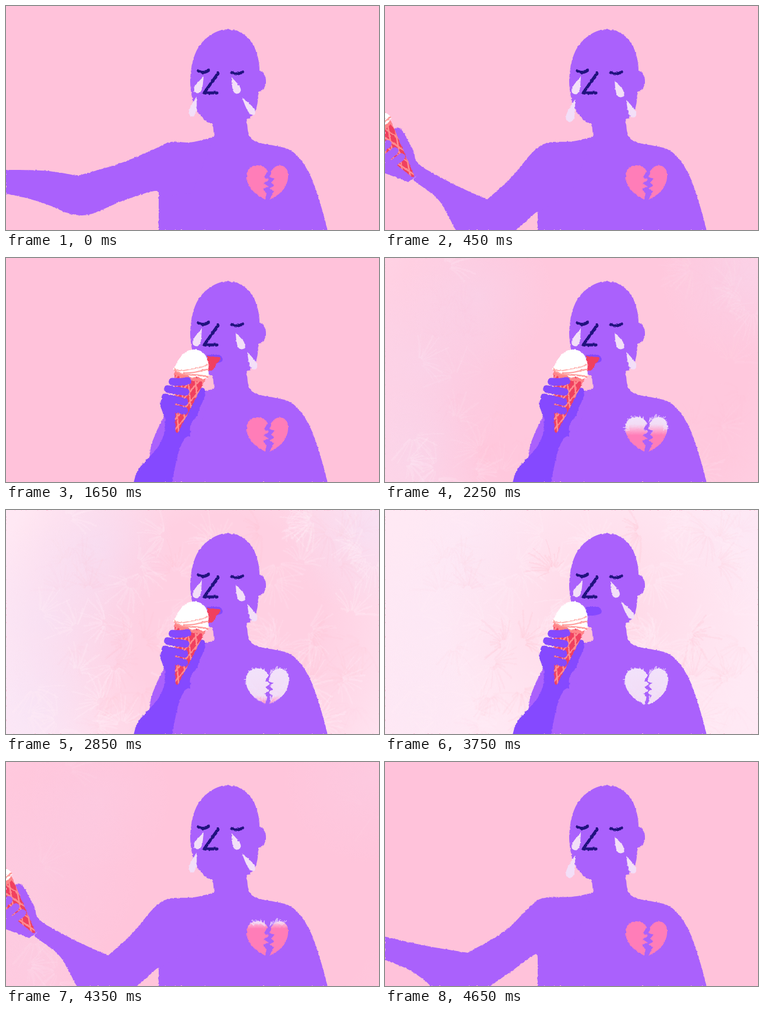
Recreate the animation shown at these times as an HTML page with a canvas. Size 640 px wide and 384 px high, loop 4800 ms.

```html
<!DOCTYPE html>
<html lang="en">
<head>
<meta charset="utf-8">
<title>Ice cream for a broken heart</title>
<style>
  html, body { margin: 0; width: 100%; height: 100%; overflow: hidden; background: #ffc2da; }
  canvas { display: block; width: 640px; height: 384px; filter: url(#rough); }
  svg { position: absolute; width: 0; height: 0; }
</style>
</head>
<body>
<svg aria-hidden="true">
  <filter id="rough" x="0" y="0" width="100%" height="100%" color-interpolation-filters="sRGB">
    <feTurbulence type="fractalNoise" baseFrequency="0.25" numOctaves="2" seed="4" result="noise"/>
    <feDisplacementMap in="SourceGraphic" in2="noise" scale="3" xChannelSelector="R" yChannelSelector="G"/>
  </filter>
</svg>
<canvas id="stage" width="640" height="384"></canvas>
<script>
const ctx = document.getElementById('stage').getContext('2d');
const STEP = 150, STEPS = 32;
const PINK = '#ffc2da', SKIN = '#aa61fc', HAND = '#8549ff', INK = '#20127e',
      TEAR = '#f3dff8', RED = '#f0405f', CORAL = '#ff8d90', ROSE = '#ff7db8';

const clamp = (v, a = 0, b = 1) => Math.min(b, Math.max(a, v));
const mix = (a, b, u) => a + (b - a) * u;
const mixAll = (a, b, u) => a.map((v, i) => mix(v, b[i], u));

function fill(d, color) {
  ctx.fillStyle = color;
  ctx.fill(typeof d === 'string' ? new Path2D(d) : d);
}
function line(d, color, width) {
  ctx.strokeStyle = color;
  ctx.lineWidth = width;
  ctx.stroke(typeof d === 'string' ? new Path2D(d) : d);
}
function seeded(s) {
  return () => {
    s = (s * 1664525 + 1013904223) >>> 0;
    return s / 4294967296;
  };
}

// Smooth curve through points from..to of a flat x,y list
function curve(path, xy, from, to) {
  const at = i => { i = clamp(i, from, to); return [xy[2 * i], xy[2 * i + 1]]; };
  path.lineTo(...at(from));
  for (let i = from; i < to; i++) {
    const [a, b, c, d] = [at(i - 1), at(i), at(i + 1), at(i + 2)];
    path.bezierCurveTo(b[0] + (c[0] - a[0]) / 6, b[1] + (c[1] - a[1]) / 6,
      c[0] - (d[0] - b[0]) / 6, c[1] - (d[1] - b[1]) / 6, ...c);
  }
}

const BODY = 'M380 40C402 40 420 54 428 75Q435 92 435 111C443 113 446 121 446 128' +
  'C446 138 441 146 433 147Q433 169 427 182Q422 191 413 195L415 214Q419 230 432 234' +
  'C452 239 475 240 488 247C505 258 517 278 525 297Q540 335 552 386L262 400L262 320' +
  'L300 236L322 233Q342 229 357 224L355 203Q340 198 330 183C320 168 316 145 316 128' +
  'C317 105 321 86 330 71C342 53 362 40 380 40Z';

// Arm outlines: shoulder, inner elbow, wrist, outer elbow, armpit
const ARM_OUT = [357,224, 322,234, 283,233, 255,245, 195,270, 123,291, 60,282, -50,281,
  -50,312, 30,328, 75,342, 110,356, 145,357, 200,334, 256,317, 262,328];
const ARM_LOW = [357,224, 322,231, 273,233, 250,247, 205,290, 142,327, 60,313, -50,287,
  -50,322, 30,351, 65,372, 95,395, 150,400, 205,367, 255,331, 262,335];
const ARM_UP = [357,224, 322,233, 285,236, 256,255, 228,298, 209,336, 190,305, 181,268,
  145,274, 150,310, 153,350, 160,384, 185,405, 230,410, 259,380, 261,376];
const SLEEVE_MID = [357,224, 322,233, 285,236, 262,262, 240,300, 228,335, 225,400];
const SLEEVE_EAT = [357,224, 322,233, 290,240, 272,270, 255,305, 247,335, 245,400];

function drawArm(pose) {
  const path = new Path2D();
  path.moveTo(320, 320);
  if (pose > 5) {
    curve(path, pose > 6 ? SLEEVE_EAT : SLEEVE_MID, 0, 6);
    path.lineTo(320, 400);
  } else {
    const xy = pose < 1 ? ARM_OUT : mixAll(ARM_LOW, ARM_UP, (pose - 1) / 4);
    curve(path, xy, 0, 5);
    curve(path, xy, 5, 7);
    curve(path, xy, 8, 15);
  }
  path.closePath();
  fill(path, SKIN);
}

const CONE = new Path2D('M-28-104L28-104L2-2Q0 2-3-3Z');

// Hand with ice cream; the origin is the tip of the cone
function drawTreat(x, y, turn, skin) {
  ctx.save();
  ctx.translate(x, y);
  ctx.rotate(turn * Math.PI / 180);
  fill('M-36-60Q-42-46-36-36Q-26-20-13 1L24 1Q18-14 21-24Q29-36 29-52Q34-72 32-80' +
    'Q29-88 22-85Q18-78 19-68L0-20L-10-50Z', skin);

  fill(CONE, RED);
  ctx.save();
  ctx.clip(CONE);
  for (let i = -8; i < 9; i++) {
    line(`M${i * 13 - 20}-110L${i * 13 + 18} 4M${i * 13 + 25}-110L${i * 13 - 35} 4`, CORAL, 2.6);
  }
  line('M-28-100Q0-93 28-100', '#ff8588', 6);
  ctx.restore();

  fill('M-31-105Q-28-111-27-119Q-24-126-22-131Q-15-146 2-147Q18-146 23-133Q28-128 28-118' +
    'Q32-110 31-104Q22-98 12-102Q3-96-6-101Q-18-98-31-105Z', '#fff');
  line('M-29-107Q-20-103-10-108T10-117T25-126', '#ffb3b0', 2.2);
  line('M-12-103Q4-106 14-112T28-118', '#ff9c9b', 2.2);
  line('M-28-104Q-14-99-2-102T30-106', '#ff9c9b', 2.8);

  line('M-27-84Q-12-86-2-91M-32-70Q-15-71-1-72M-33-55L1-55M-31-40L4-40', skin, 13);
  ctx.restore();
}

function drawHold(pose) {
  if (pose < 1) return;
  if (pose < 6) {
    const u = (pose - 1) / 4;
    drawTreat(mix(-60, 159, u), mix(305, 281, u), mix(-75, 0, u), SKIN);
    return;
  }
  const dx = pose > 6 ? 0 : -70, dy = pose > 6 ? 0 : -8;
  ctx.save();
  ctx.translate(dx, dy);
  fill('M272 280Q276 300 262 322Q250 338 235 352Q220 366 217 400L282 400Q291 350 298 326' +
    'Q304 310 318 298L300 280Z', HAND);
  ctx.restore();
  drawTreat(293 + dx, 300 + dy, pose > 6 ? 13 : 7, HAND);
}

function tear(x1, y1, x2, y2, w) {
  const len = Math.hypot(x2 - x1, y2 - y1);
  ctx.save();
  ctx.translate(x1, y1);
  ctx.rotate(Math.atan2(y2 - y1, x2 - x1));
  fill(`M0 0C${len * .4} ${-w * .35} ${len * .62} ${-w * .55} ${len * .8} ${-w * .5}` +
    `C${len * 1.06} ${-w * .4} ${len * 1.06} ${w * .4} ${len * .8} ${w * .5}` +
    `C${len * .62} ${w * .55} ${len * .4} ${w * .35} 0 0Z`, TEAR);
  ctx.restore();
}

function drawFace(fallen) {
  line('M330 111Q339 117 348 110M387 114Q397 119 406 113', INK, 5);
  line('M364 115L340 149L362 149', INK, 5);
  if (fallen) {
    tear(336, 121, 324, 151, 13);
    tear(326, 160, 315, 199, 14);
    tear(394, 128, 407, 156, 13);
    tear(414, 161, 428, 191, 12);
  } else {
    tear(339, 121, 326, 149, 13);
    tear(327, 155, 318, 189, 12);
    tear(387, 122, 399, 150, 13);
    tear(405, 157, 426, 186, 11);
  }
}

function drawMouth(open) {
  fill('M345 166L366 166Q374 171 371 177Q364 182 345 181Z', HAND);
  if (open) fill('M345 168L367 170Q371 174 361 181Q359 189 353 193L345 193Z', RED);
}

const HALVES = new Path2D(
  'M449 283Q443 273 431 273C419 273 413 282 413 293C413 310 428 323 445 332L447 321' +
  'L441 314L450 309L442 304L451 298L443 293Z' +
  'M455 283Q460 274 470 273C481 274 485 283 484 293C483 311 470 324 452 332L460 317' +
  'L453 313L460 307L454 302L461 296L452 293Z');

function drawHeart(frost) {
  fill(HALVES, ROSE);
  if (frost <= 0) return;
  const snow = ctx.createLinearGradient(0, 272, 0, 334);
  snow.addColorStop(0, '#f2e2fb');
  snow.addColorStop(clamp(frost - .18), '#f2dcf5');
  snow.addColorStop(clamp(frost + .12), frost >= 1 ? '#f0dff9' : 'rgba(255,220,235,0)');
  fill(HALVES, snow);
  line(HALVES, snow, 3 * frost);
  const rnd = seeded(11);
  for (let i = 0; i < 110; i++) {
    const a = i / 110 * Math.PI * 2, grow = 2 + rnd() * 3, lean = rnd() * 4 - 2;
    const x = 448.5 + 34 * Math.sin(a) ** 3;
    const y = 297 - 2 * (13 * Math.cos(a) - 5 * Math.cos(2 * a) - 2 * Math.cos(3 * a) - Math.cos(4 * a));
    if ((y - 272) / 62 > frost || Math.abs(x - 448.5) < 5) continue;
    const r = Math.hypot(x - 448, y - 300), ux = (x - 448) / r, uy = (y - 300) / r;
    line(`M${x - ux * 4} ${y - uy * 4}L${x + ux * grow + lean} ${y + uy * grow - lean}`,
      'rgba(242,226,251,.75)', 1.3);
  }
}

function glow(x, y, inner, outer, rgb, from, to) {
  const g = ctx.createRadialGradient(x, y, inner, x, y, outer);
  g.addColorStop(0, `rgba(${rgb},${from})`);
  g.addColorStop(1, `rgba(${rgb},${to})`);
  ctx.fillStyle = g;
  ctx.fillRect(0, 0, 640, 384);
}

// Frost creeps in from the edges as level goes from 0 to 1
function drawFrost(level) {
  ctx.fillStyle = PINK;
  ctx.fillRect(0, 0, 640, 384);
  if (level <= 0) return;
  ctx.fillStyle = `rgba(255,233,240,${level * .62})`;
  ctx.fillRect(0, 0, 640, 384);
  const inner = 50 + 260 * (1 - level);
  glow(370, 180, inner, inner + 220, '255,234,245', 0, clamp(level * 1.9) * .92);
  for (const [x, y, r] of [[70, 190, 170], [620, 30, 150], [50, 350, 130], [160, 60, 130]]) {
    glow(x, y, 0, r, '240,226,250', level * (1.1 - level) * 1.4, 0);
  }
  const rnd = seeded(29);
  for (let i = 0; i < 110; i++) {
    const x = rnd() * 640, y = rnd() * 384, turn = rnd() * 6.3, pale = rnd() < .6;
    const dist = Math.hypot(x - 370, y - 180);
    const ramp = clamp((level * 1.5 - .75 + dist / 420) * 1.6);
    const near = clamp(1.25 - dist / 250);
    const alpha = ramp * (pale ? .3 : .32 * near);
    for (let j = 0; j < 13; j++) {
      const a = turn + j * .22 + rnd() * .2, len = 16 + rnd() * 42, w = 1.5 + rnd() * 2;
      if (alpha < .01) continue;
      const ex = x + Math.cos(a) * len, ey = y + Math.sin(a) * len;
      line(`M${x + Math.cos(a) * 8} ${y + Math.sin(a) * 8}Q${(x + ex) / 2 + 3} ${(y + ey) / 2 - 3} ${ex} ${ey}`,
        `rgba(${pale ? '255,236,246' : '255,190,206'},${alpha})`, w);
    }
  }
}

const THAW = [1, .75, .42, .25, .1];
const HEART_THAW = [1, .8, .55, .3, .1];

function draw(k) {
  const pose = Math.min(k, STEPS - k, 7);
  const fallen = k % 4 > 1;
  const level = k < 25 ? clamp((k - 12) / 13) : THAW[k - 25] || 0;
  const heart = k < 25 ? clamp((k - 12) / 7.6) : HEART_THAW[k - 25] || 0;
  ctx.lineCap = ctx.lineJoin = 'round';
  drawFrost(level);
  if (pose > 6) fill('M338 200L357 200L358 225L336 230Z', '#ffc0d6');
  fill(BODY, SKIN);
  drawArm(pose);
  drawHeart(heart);
  drawFace(fallen);
  if (pose > 6) drawMouth(fallen);
  drawHold(pose);
}

let shown = -1;
const start = performance.now();
function tick() {
  const k = Math.floor((performance.now() - start) / STEP) % STEPS;
  if (k !== shown) draw(shown = k);
  requestAnimationFrame(tick);
}
tick();
</script>
</body>
</html>
```
